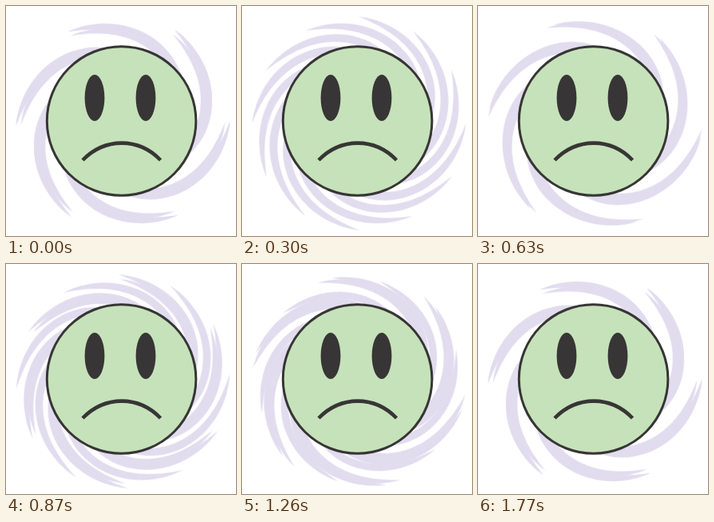
Animation, 288 px wide and 288 px high, one loop 1800 ms. Source, as an HTML page:

```html
<!DOCTYPE html>
<html lang="en">
<head>
<meta charset="utf-8">
<title>Dizzy face</title>
<style>
  html, body { margin: 0; width: 100%; height: 100%; overflow: hidden; background: #fff; }
  svg { display: block; width: 100%; height: 100%; }
  .swirl { animation: spin 1.8s steps(60, jump-none) infinite; }
  .fast { --turn: 360deg; }
  .mid { --turn: 180deg; }
  .slow { --turn: 60deg; --size: 0.955; }
  @keyframes spin {
    from { transform: rotate(0deg) scale(var(--size, 1)); }
    to { transform: rotate(var(--turn)) scale(var(--size, 1)); }
  }
</style>
</head>
<body>
<svg viewBox="0 0 288 288">
  <g transform="translate(146.5 147) rotate(-1)" fill="#e1dcee">
    <path class="swirl fast"/>
    <path class="swirl mid"/>
    <path class="swirl slow"/>
  </g>
  <g fill="#373535">
    <circle cx="144.6" cy="144" r="93.3" fill="#c6e2ba" stroke="#373535" stroke-width="3"/>
    <ellipse cx="111" cy="115" rx="12.4" ry="29"/>
    <ellipse cx="175" cy="115" rx="12.4" ry="29"/>
    <path d="M96 193C124 164.500 166 164.500 193.500 193" fill="none" stroke="#373535" stroke-width="4.600"/>
  </g>
</svg>
<script>
  const ARMS = 6;

  // Edge radius as a function of degrees behind the tip
  const outer = a => 134 - 0.3 * a - 0.0023 * a * a;
  const inner = a => outer(a) - 10.5 * (1 - Math.exp(-a / 16));

  const point = (r, deg) => {
    const t = deg * Math.PI / 180;
    return (r * Math.cos(t)).toFixed(2) + ' ' + (r * Math.sin(t)).toFixed(2);
  };

  function arm(start) {
    const pts = [];
    for (let a = 0; a <= 100; a += 2) pts.push(point(outer(a), start + a));
    for (let a = 100; a > 0; a -= 2) pts.push(point(inner(a), start + a));
    return 'M' + pts.join('L') + 'Z';
  }

  const shape = Array.from({ length: ARMS }, (_, i) => arm(i * 360 / ARMS)).join('');
  document.querySelectorAll('.swirl').forEach(el => el.setAttribute('d', shape));
</script>
</body>
</html>
```
